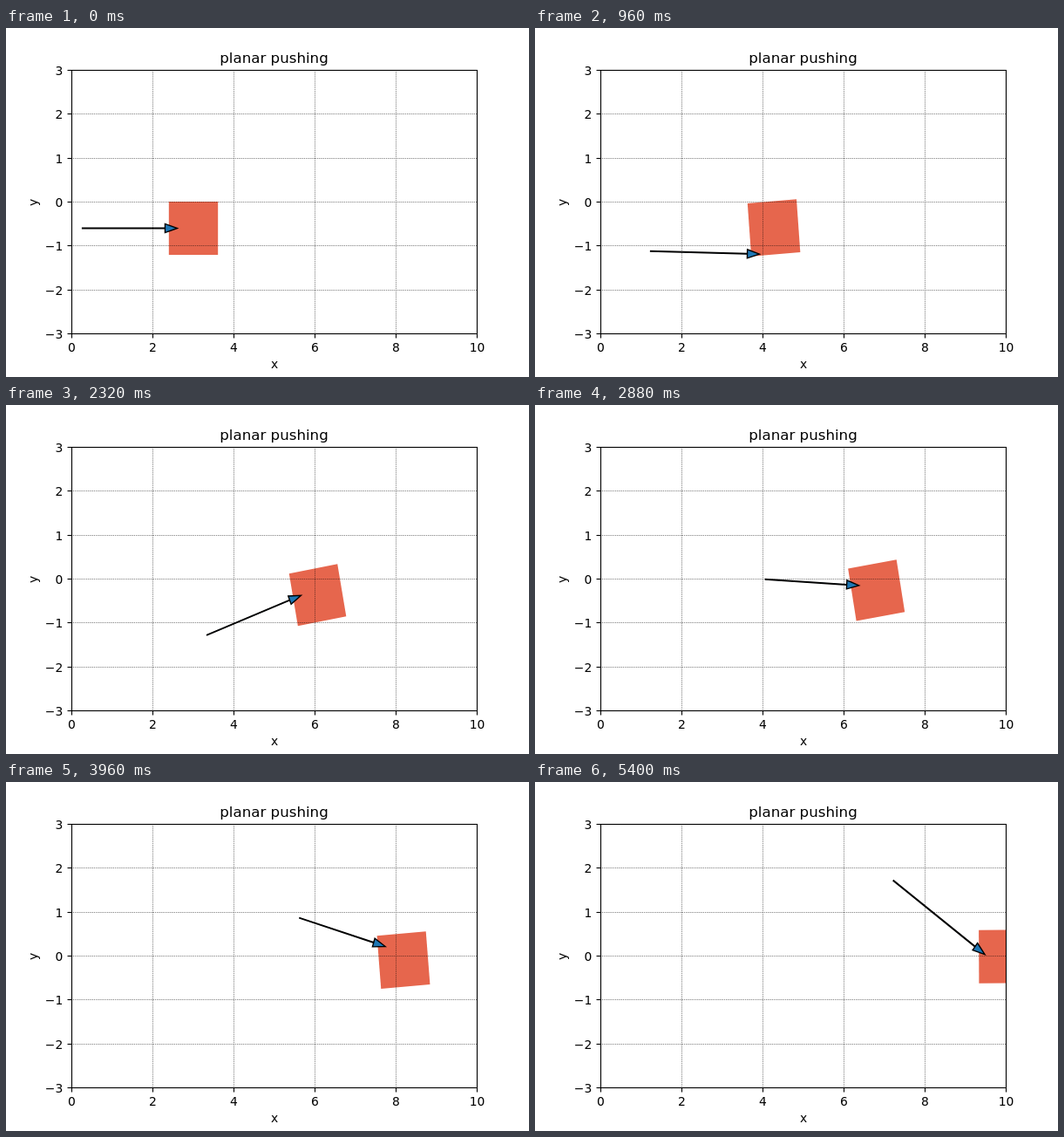
Recreate the animation shown at these times as an HTML page with a canvas. Size 600 px wide and 400 px high, loop 5.44 s.

```html
<!DOCTYPE html>
<html>
<head>
<meta charset="utf-8">
<style>
html, body { margin: 0; width: 100%; height: 100%; overflow: hidden; background: #fff; }
canvas { display: block; }
</style>
</head>
<body>
<canvas id="stage" width="600" height="400"></canvas>
<script>
const ctx = document.getElementById('stage').getContext('2d');
const LOOP = 5.44, FPS = 25;
const UX = 46.5, UY = 302 / 6;                 // pixels per data unit
const LEFT = 75.5, RIGHT = 540.5, TOP = 48.5, BOTTOM = 350.5;
const { PI, sin, cos } = Math;

// time (s), contact height on the pushed face, vertical force
const pushes = [
  [0, 0, 0],
  [0.96, -0.54, -0.06],
  [1.8, -0.22, 1.64],
  [2.88, 0.25, -0.12],
  [3.64, 0.4, 2.4],
  [3.96, 0.46, -0.56],
  [4.52, 0.02, 2.45],
  [5.08, 0.1, 2.45],
  [5.4, 0.23, -1.5]
];

function pushAt(t) {
  const i = Math.max(1, pushes.findIndex(k => k[0] >= t));
  const a = pushes[i - 1], b = pushes[i], u = (t - a[0]) / (b[0] - a[0]);
  const [, contact, fy] = a.map((v, k) => v + (b[k] - v) * u);
  return { contact, fx: 2.04 - 2.2 * contact ** 3, fy };
}

// Steady drift to the right while the block turns, climbs and straightens.
function blockAt(t) {
  const turn = sin(PI * (t / 5.4) ** 0.86) ** 2;
  const climb = Math.max(0, (t - 0.8) / 4.6) ** 0.75;
  return {
    x: 215 + 63.06 * t - 0.62 * t * t - sin(2 * PI * t / 5.4),
    y: 200 + 29.5 * cos(PI / 2 * climb) ** 2,
    angle: (10.2 * turn + 0.055 * t) * PI / 180
  };
}

const rotate = ([x, y], a) => [x * cos(a) - y * sin(a), x * sin(a) + y * cos(a)];

// Fills a polygon given in data units around the pixel position of the block.
function polygon(points, block, fill) {
  ctx.beginPath();
  for (const [x, y] of points) ctx.lineTo(block.x + x * UX, block.y - y * UY);
  ctx.closePath();
  ctx.fillStyle = fill;
  ctx.fill();
}

function drawBlock(block) {
  const r = 0.606;
  const corners = [[-r, -r], [r, -r], [r, r], [-r, r]];
  polygon(corners.map(p => rotate(p, block.angle)), block, '#e6664d');
}

function drawArrow(block, { contact, fx, fy }) {
  const [bx, by] = rotate([-0.7, contact], block.angle);
  const length = Math.hypot(fx, fy), heading = Math.atan2(fy, fx), thin = 0.006;
  const outline = [[0.3, 0], [0, -0.1], [0, -thin], [-length, -thin],
    [-length, thin], [0, thin], [0, 0.1]];
  polygon(outline.map(p => {
    const [x, y] = rotate(p, heading);
    return [bx + x, by + y];
  }), block, '#1f77b4');
  ctx.lineWidth = 1.39;
  ctx.stroke();
}

function line(x1, y1, x2, y2) {
  ctx.beginPath();
  ctx.moveTo(x1, y1);
  ctx.lineTo(x2, y2);
  ctx.stroke();
}

function gridLine(...ends) {
  ctx.lineWidth = 0.69;
  ctx.setLineDash([0.69, 1.15]);
  line(...ends);
  ctx.setLineDash([]);
  ctx.lineWidth = 1.11;
}

function text(str, x, y, align = 'center', size = 13.89) {
  ctx.font = size + 'px "DejaVu Sans", sans-serif';
  ctx.textAlign = align;
  ctx.fillText(str, x, y);
}

function drawAxes() {
  ctx.fillStyle = '#000';
  for (let v = 0; v <= 10; v += 2) {
    const x = LEFT + v * UX;
    gridLine(x, BOTTOM, x, TOP);
    line(x, BOTTOM, x, BOTTOM + 5);
    text(v, x, 371);
  }
  for (let v = -3; v <= 3; v++) {
    const y = 400.5 - Math.round(50 + (v + 3) * UY);
    gridLine(LEFT, y, RIGHT, y);
    line(LEFT - 5, y, LEFT, y);
    text(String(v).replace('-', '\u2212'), 65.3, Math.round(y + 5.2), 'right');
  }
  ctx.strokeRect(LEFT, TOP, RIGHT - LEFT, BOTTOM - TOP);
  text('planar pushing', 307.5, 40, 'center', 16.67);
  text('x', 308, 390);
  ctx.save();
  ctx.translate(36, 200);
  ctx.rotate(-PI / 2);
  text('y', 0, 0);
  ctx.restore();
}

function draw(seconds) {
  const t = Math.floor(seconds % LOOP * FPS) / FPS;
  const block = blockAt(t);
  ctx.fillStyle = '#fff';
  ctx.fillRect(0, 0, 600, 400);
  ctx.strokeStyle = '#000';
  ctx.save();
  ctx.beginPath();
  ctx.rect(LEFT, TOP, RIGHT - LEFT, BOTTOM - TOP);
  ctx.clip();
  drawBlock(block);
  drawArrow(block, pushAt(t));
  ctx.restore();
  drawAxes();
}

const start = performance.now();
function tick() {
  draw((performance.now() - start) / 1000);
  requestAnimationFrame(tick);
}
tick();
</script>
</body>
</html>
```
